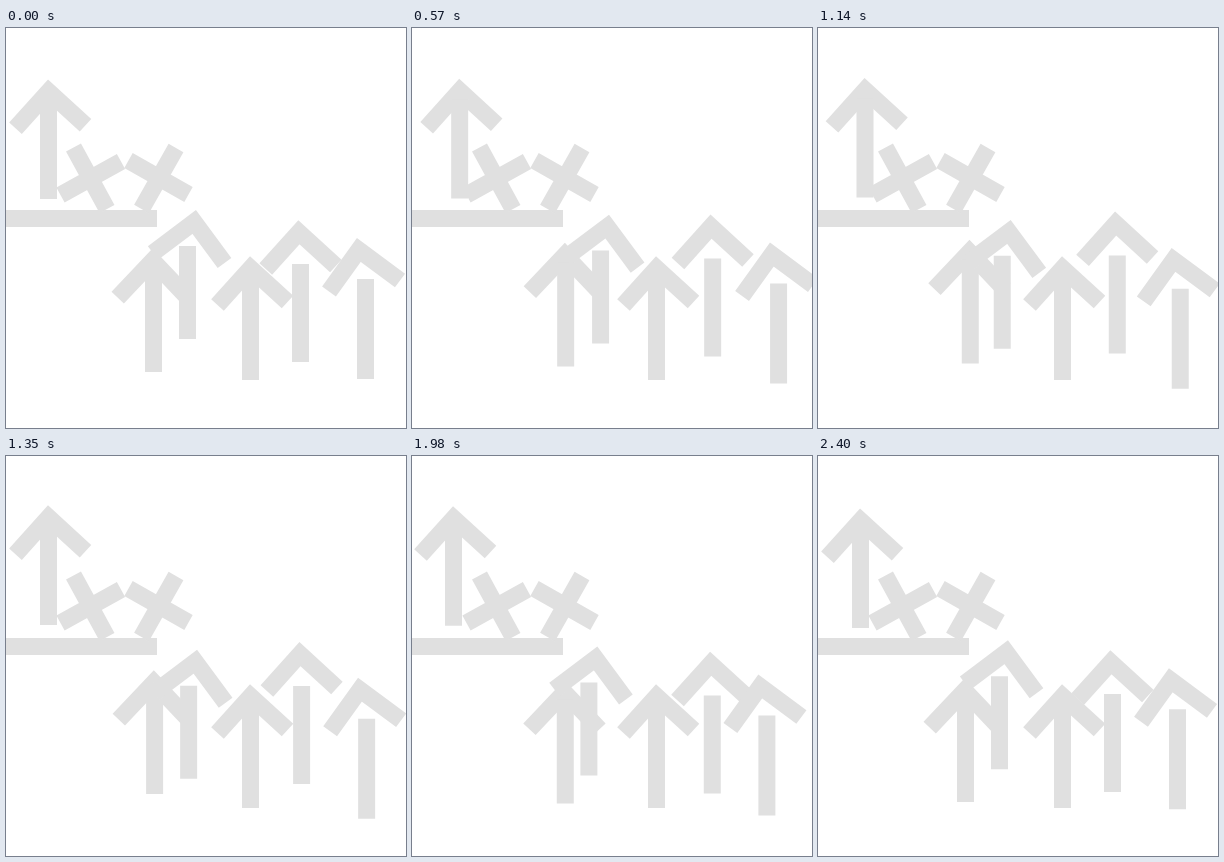
Animation of 400x400 px, one loop 2.7 s. Source, as an HTML page:

```html
<!DOCTYPE html>
<html lang="en">
<head>
<meta charset="utf-8">
<title>Drifting arrows</title>
<style>
  html, body { margin: 0; height: 100%; overflow: hidden; background: #fff; }
  svg { display: block; width: 100vw; height: 100vh; }
  path { fill: none; stroke: #e0e0e0; stroke-width: 17; stroke-linejoin: miter; }
</style>
</head>
<body>
<svg viewBox="0 0 400 400">
  <path d="M0 190.5H151"/>
  <path d="M67.5 119.5L101 181M54.5 167L115 133.5"/>
  <path d="M170 120L135.5 181M122.5 132.5L182.5 166.5"/>
</svg>
<script>
const LOOP = 2700, STEP = 30, LAST = 2400;

// Chevron centre lines, relative to the outer tip
const heads = {
  plain: 'm-32.5 49L.6 12.2L37.5 46',
  even: 'm-35 49L0 12L35 49',
  left: 'm-43 43L-1.8 12L28.5 53',
  right: 'm-28 53.5L1.8 12L43 42.5'
};

// Drift tables: [time, dx, dy]
const still = [[0, 0, 0], [LAST, 0, 0]];
const sway = [[0, 0, 0], [990, 9, -1], [1260, .9, -1.8], [1620, -2.8, -3], [1980, -1, -1.3], [LAST, 0, 1]];
const rise = [[0, 0, 0], [990, 10.7, -9.6], [1260, 0, -7.8], [1860, 7.4, 4], [LAST, 0, 2]];
const sink = [[0, 0, 0], [540, 7.3, 4.3], [1590, -.7, 14], [1980, -4.6, 8.5], [LAST, 0, 2.3]];

const svg = document.querySelector('svg');

function addPath(parent, d, x = 0, y = 0) {
  const path = document.createElementNS(svg.namespaceURI, 'path');
  path.setAttribute('d', d);
  path.setAttribute('transform', `translate(${x} ${y})`);
  parent.append(path);
}

function arrow(head, tipX, tipY, stemX, top, bottom, keys) {
  const el = document.createElementNS(svg.namespaceURI, 'g');
  addPath(el, heads[head], tipX, tipY);
  addPath(el, `M${stemX} ${top}V${bottom}`);
  svg.append(el);
  return { el, keys };
}

const arrows = [
  arrow('plain', 42, 51.3, 42.5, 72, 171, sway),
  arrow('even', 146.7, 220.7, 147.5, 240, 344, rise),
  arrow('left', 190, 182, 181.5, 218, 311, sink),
  arrow('plain', 244, 228, 244.5, 248, 352, still),
  arrow('plain', 292.3, 192, 294.5, 236, 334, rise),
  arrow('right', 351, 210, 359.5, 251, 351, sink)
];

function offset(keys, t) {
  const i = Math.max(1, keys.findIndex(k => k[0] >= t));
  const [t0, x0, y0] = keys[i - 1], [t1, x1, y1] = keys[i];
  const p = (t - t0) / (t1 - t0);
  return [x0 + (x1 - x0) * p, y0 + (y1 - y0) * p];
}

function draw() {
  const now = performance.now() % LOOP;
  const t = Math.min(LAST, Math.floor(now / STEP) * STEP);
  for (const { el, keys } of arrows) {
    const [x, y] = offset(keys, t);
    el.setAttribute('transform', `translate(${x} ${y})`);
  }
  requestAnimationFrame(draw);
}
draw();
</script>
</body>
</html>
```
